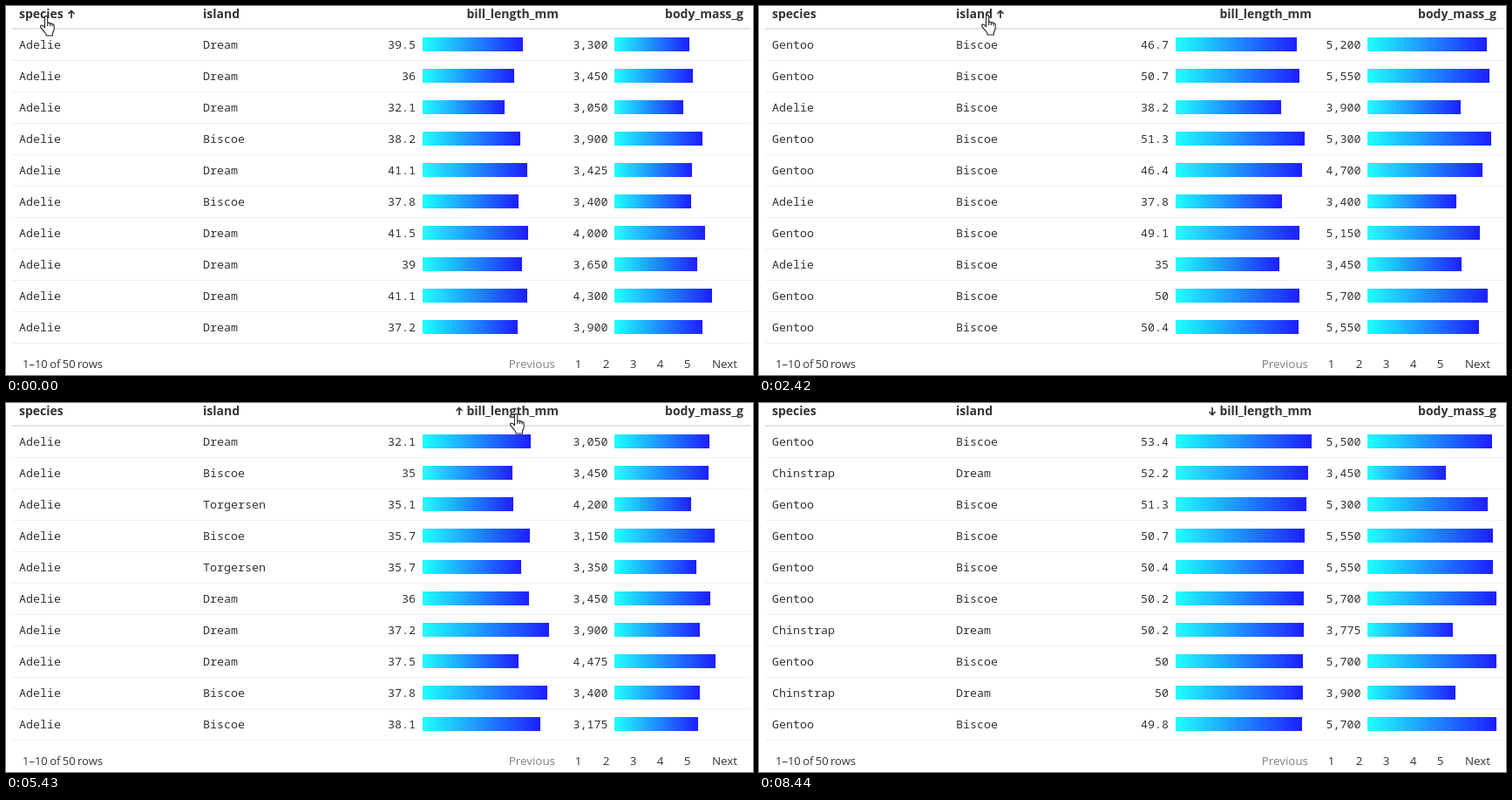
Write an HTML page that moves like this. It is 857 px wide and 423 px high and loops after 9200 ms.

```html
<!DOCTYPE html>
<html lang="en">
<head>
<meta charset="utf-8">
<title>Sortable table</title>
<style>
  html, body { margin: 0; width: 100%; height: 100%; overflow: hidden; background: #fff; }
  svg { display: block; }
  text { fill: #333; font: 13.4px "Open Sans", "Noto Sans", sans-serif; }
  .head { font-size: 14px; font-weight: 700; }
  .cell { font: 13.33px "Noto Sans Mono", "DejaVu Sans Mono", monospace; }
  .info { font-size: 13px; word-spacing: -1px; }
  .off { fill: #808080; }
  .end { text-anchor: end; }
  .mid { text-anchor: middle; }
  .bar { fill: url(#blue); shape-rendering: crispEdges; }
</style>
</head>
<body>
<svg id="stage" width="857" height="423" viewBox="0 0 857 423">
  <defs>
    <linearGradient id="blue">
      <stop offset="0" stop-color="#1effff"/>
      <stop offset="1" stop-color="#1e1eff"/>
    </linearGradient>
  </defs>
</svg>
<script>
const LOOP = 9200, ROWS = 10, PITCH = 36;
const BILL = { x: 478, scale: 156 / 53.4 }, MASS = { x: 698, scale: 148 / 5700 };
const NAMES = {
  A: 'Adelie', G: 'Gentoo', C: 'Chinstrap',
  d: 'Dream', b: 'Biscoe', t: 'Torgersen'
};

// Each view: click time, delay before the bars move, arrow x, arrow direction, rows.
const views = [
  [0, 0, 75, 1, 'Ad 39.5 3300,Ad 36 3450,Ad 32.1 3050,Ab 38.2 3900,Ad 41.1 3425,Ab 37.8 3400,Ad 41.5 4000,Ad 39 3650,Ad 41.1 4300,Ad 37.2 3900'],
  [150, 125, 75, -1, 'Gb 48.4 5400,Gb 46.5 5200,Gb 45.1 4400,Gb 50.2 5700,Gb 53.4 5500,Gb 46.5 4550,Gb 47.7 4750,Gb 47.2 4975,Gb 46.9 4875,Gb 45.8 4200'],
  [2030, 78, 277, 1, 'Gb 46.7 5200,Gb 50.7 5550,Ab 38.2 3900,Gb 51.3 5300,Gb 46.4 4700,Ab 37.8 3400,Gb 49.1 5150,Ab 35 3450,Gb 50 5700,Gb 50.4 5550'],
  [3670, 40, 277, -1, 'At 42.8 4250,At 35.1 4200,At 35.7 3350,At 42.5 4500,At 38.9 3625,At 42 4250,Cd 50.2 3775,Ad 37.5 4475,Cd 49.5 3800,Cd 46.4 3700'],
  [5280, 95, 520, 1, 'Ad 32.1 3050,Ab 35 3450,At 35.1 4200,Ab 35.7 3150,At 35.7 3350,Ad 36 3450,Ad 37.2 3900,Ad 37.5 4475,Ab 37.8 3400,Ab 38.1 3175'],
  [7130, 85, 520, -1, 'Gb 53.4 5500,Cd 52.2 3450,Gb 51.3 5300,Gb 50.7 5550,Gb 50.4 5550,Gb 50.2 5700,Cd 50.2 3775,Gb 50 5700,Cd 50 3900,Gb 49.8 5700']
].map(([start, delay, arrowX, dir, list]) => ({
  start, delay, arrowX, dir,
  rows: list.split(',').map(row => {
    const [key, bill, mass] = row.split(' ');
    return { species: NAMES[key[0]], island: NAMES[key[1]], bill: +bill, mass: +mass };
  })
}));

const stage = document.getElementById('stage');

function add(tag, attrs, content = '') {
  const el = document.createElementNS('http://www.w3.org/2000/svg', tag);
  for (const name in attrs) el.setAttribute(name, attrs[name]);
  el.textContent = content;
  return stage.appendChild(el);
}
const label = (x, y, cls, content) => add('text', { x, y, class: cls }, content);
const rule = (y, height, fill) => add('rect', { x: 7, y, width: 847, height, fill });

label(15, 14, 'head', 'species');
label(226, 14, 'head', 'island');
label(634, 14, 'head end', 'bill_length_mm');
label(846, 14, 'head end', 'body_mass_g');
rule(25, 2, '#e4e4e4');

const cells = Array.from({ length: ROWS }, (_, i) => {
  const top = 27 + i * PITCH, base = top + 22;
  const bar = x => add('rect', { x, y: top + 9, height: 16, class: 'bar' });
  rule(top + 35, 1, '#f0f0f0');
  return {
    species: label(15, base, 'cell', ''),
    island: label(226, base, 'cell', ''),
    bill: label(470, base, 'cell end', ''),
    mass: label(690.5, base, 'cell end', ''),
    billBar: bar(BILL.x),
    massBar: bar(MASS.x)
  };
});

label(19, 415, 'info', '1–10 of 50 rows');
label(630, 415, 'end off', 'Previous');
[656.5, 688.5, 719.5, 750.5, 781.5].forEach((x, i) => label(x, 415, 'mid', i + 1));
label(839, 415, 'end', 'Next');

const arrow = add('path', {
  d: 'M0 4.5V-4M-3.5 -.5L0 -4L3.5 -.5', fill: 'none', stroke: '#333', 'stroke-width': 1.7
});
const hand = add('path', {
  d: 'M6 14V2.5a1.6 1.6 0 0 1 3.2 0V9q1.5-1 2.7.6q1.6-.8 2.6.8q2-.5 2.2 1.4V15.5q0 2.5-1.8 5V23.5H7.5V21.5' +
     'Q5 18.5 1.2 13.8q-.6-2 1.2-2.3q1.6 0 3.6 2.8zM9.2 9v3.5M11.9 9.6v3M14.5 10.4v2.6',
  fill: '#fff', stroke: '#222', 'stroke-width': 1.1, 'stroke-linejoin': 'round'
});

const clamp = v => Math.min(1, Math.max(0, v));
const mix = (a, b, p) => a + (b - a) * p;
const smooth = p => p * p * (3 - 2 * p);
const slowDown = p => 1 - (1 - p) ** 2;

// CSS "ease": cubic-bezier(.25, .1, .25, 1), solved by bisection.
function ease(x) {
  let lo = 0, hi = 1;
  for (let i = 0; i < 20; i++) {
    const s = (lo + hi) / 2;
    if (0.75 * s - 0.75 * s * s + s ** 3 < x) lo = s; else hi = s;
  }
  return 0.3 * lo * (1 - lo) ** 2 + 3 * lo * lo * (1 - lo) + lo ** 3;
}

// Pointer trips: start, end, target x, target y, easing.
const trips = [
  [880, 1730, 254.5, 9.5, smooth],
  [4250, 4960, 577.5, 11.5, slowDown],
  [7970, 8440, 866, 384, smooth]
];

function pointerAt(t) {
  let x = 38.5, y = 10.5;
  for (const [from, to, tx, ty, curve] of trips) {
    const p = curve(clamp((t - from) / (to - from)));
    x = mix(x, tx, p);
    y = mix(y, ty, p);
  }
  return [x, y];
}

let shown = -1;

function showView(index) {
  if (index === shown) return;
  shown = index;
  const { rows, arrowX, dir } = views[index];
  rows.forEach((row, i) => {
    for (const key of ['species', 'island', 'bill']) cells[i][key].textContent = row[key];
    cells[i].mass.textContent = row.mass.toLocaleString('en-US');
  });
  arrow.setAttribute('transform', `translate(${arrowX} 9.5) scale(1 ${dir})`);
}

function draw(now) {
  const t = now % LOOP;
  const index = views.findLastIndex(v => t >= v.start);
  const view = views[index], before = views[Math.max(0, index - 1)];
  const p = ease(clamp((t - view.start - view.delay) / 1000));
  showView(index);
  view.rows.forEach((row, i) => {
    const old = before.rows[i];
    const size = (key, scale) => Math.round(mix(old[key], row[key], p) * scale);
    cells[i].billBar.setAttribute('width', size('bill', BILL.scale));
    cells[i].massBar.setAttribute('width', size('mass', MASS.scale));
  });
  hand.setAttribute('transform', `translate(${pointerAt(t)})`);
  hand.setAttribute('visibility', t < 8440 ? 'visible' : 'hidden');
}

const begin = performance.now();
function tick() {
  draw(performance.now() - begin);
  requestAnimationFrame(tick);
}
tick();
</script>
</body>
</html>
```
